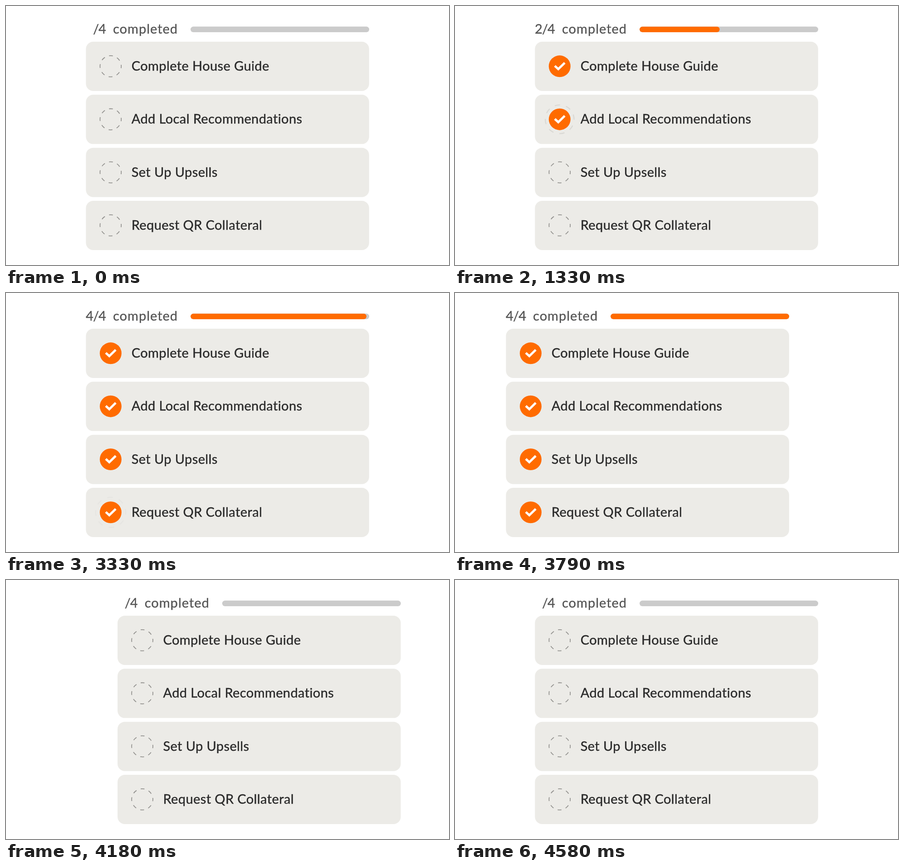
Animation of 977x573 px, one loop 4610 ms. Source, as an HTML page with a canvas:

```html
<!DOCTYPE html>
<html lang="en">
<head>
<meta charset="utf-8">
<title>Checklist</title>
<style>
  html, body { margin: 0; width: 100%; height: 100%; overflow: hidden; background: #fff; }
  canvas { display: block; }
</style>
</head>
<body>
<canvas id="stage" width="977" height="573"></canvas>
<script>
const ctx = document.getElementById('stage').getContext('2d');
const LOOP = 4610;
const STEPS = [0, 840, 1740, 2635];
const SLIDE = { start: 3636, length: 945, left: 104.5, width: 768 };
const TASKS = ['Complete House Guide', 'Add Local Recommendations', 'Set Up Upsells', 'Request QR Collateral'];
const BAR = [407, 45.6, 394, 12.4];
const ORANGE = '#ff6b00';
const LINE = 33.6;

function bezier(x1, y1, x2, y2) {
  const curve = (a, b, s) => 3 * a * s * (1 - s) ** 2 + 3 * b * s * s * (1 - s) + s ** 3;
  return x => {
    if (x <= 0) return 0;
    if (x >= 1) return 1;
    let low = 0, high = 1;
    for (let i = 0; i < 24; i++) {
      const mid = (low + high) / 2;
      if (curve(x1, x2, mid) < x) low = mid; else high = mid;
    }
    return curve(y1, y2, low);
  };
}
const ease = bezier(.25, .1, .25, 1);
const easeInOut = bezier(.44, 0, .56, 1);
const easeSlide = bezier(.44, 0, 0, 1);

function box(x, y, w, h, r, fill) {
  ctx.fillStyle = fill;
  ctx.beginPath();
  ctx.roundRect(x, y, w, h, r);
  ctx.fill();
}

// A hairline outline gives the letters a slightly sturdier weight.
function text(str, x, y, color, spacing) {
  ctx.font = '29px Lato, sans-serif';
  ctx.letterSpacing = spacing + 'px';
  ctx.fillStyle = ctx.strokeStyle = color;
  ctx.lineWidth = .4;
  ctx.fillText(str, x, y);
  ctx.strokeText(str, x, y);
}

function clipTo(x, y, w, h, r = 0) {
  ctx.beginPath();
  ctx.roundRect(x, y, w, h, r);
  ctx.clip();
}

function drawRing(p) {
  if (p >= 1) return;
  const r = 23.4, pitch = Math.PI * r / 4, dash = 8.6;
  ctx.save();
  ctx.globalAlpha = 1 - p;
  ctx.scale(1 + .45 * p, 1 + .45 * p);
  ctx.rotate(p * Math.PI / 4);
  ctx.setLineDash([dash, pitch - dash]);
  ctx.lineDashOffset = dash / 2;
  ctx.lineWidth = 1.8;
  ctx.strokeStyle = '#949390';
  ctx.beginPath();
  ctx.arc(0, 0, r, 0, 2 * Math.PI);
  ctx.stroke();
  ctx.restore();
}

function drawCheck(p) {
  if (p <= 0) return;
  ctx.save();
  ctx.scale(p, p);
  box(-24, -24, 48, 48, 24, ORANGE);
  ctx.strokeStyle = '#fff';
  ctx.lineWidth = 5;
  ctx.beginPath();
  ctx.moveTo(-10.7, -.8);
  ctx.lineTo(-3, 6.3);
  ctx.lineTo(11.2, -7.6);
  ctx.stroke();
  ctx.restore();
}

function drawHeader(t) {
  const total = f => STEPS.reduce((sum, start) => sum + f(t - start), 0);
  const roll = total(d => easeInOut((d - 90) / 240));
  const progress = total(d => ease(d / 1000)) / 4;
  const [x, y, w, h] = BAR;

  ctx.save();
  clipTo(174, 34, 20, 34);
  for (let n = 1; n <= 4; n++) text(n, 176, 61 + (n - roll) * LINE, '#555', 0);
  ctx.restore();
  text('/4', 192, 61, '#555', -1);
  text('completed', 236, 61, '#555', 1);

  box(x, y, w, h, h / 2, '#cbcbcb');
  ctx.save();
  clipTo(x, y, w, h, h / 2);
  if (progress > 0) box(x, y, w * progress, h, h / 2, ORANGE);
  ctx.restore();
}

function drawCard(t, shift) {
  ctx.save();
  ctx.translate(shift, 0);
  drawHeader(t);
  TASKS.forEach((task, i) => {
    const y = 79 + i * 117.33, since = t - STEPS[i];
    box(176.3, y, 624.5, 109, 16, '#ecebe7');
    text(task, 276.7, y + 64, '#2a2a2a', .4);
    ctx.save();
    ctx.translate(230.8, y + 54.3);
    drawRing(ease(since / 1000));
    drawCheck(ease(since / 400));
    ctx.restore();
  });
  ctx.restore();
}

function frame(now) {
  const t = now % LOOP;
  const p = easeSlide((t - SLIDE.start) / SLIDE.length);
  ctx.fillStyle = '#fff';
  ctx.fillRect(0, 0, 977, 573);
  ctx.save();
  clipTo(SLIDE.left, 0, SLIDE.width, 573);
  if (p < 1) drawCard(t, -p * SLIDE.width);
  if (p > 0) drawCard(0, (1 - p) * SLIDE.width);
  ctx.restore();
}

const begin = performance.now();
function tick() {
  frame(performance.now() - begin);
  requestAnimationFrame(tick);
}
tick();
</script>
</body>
</html>
```
